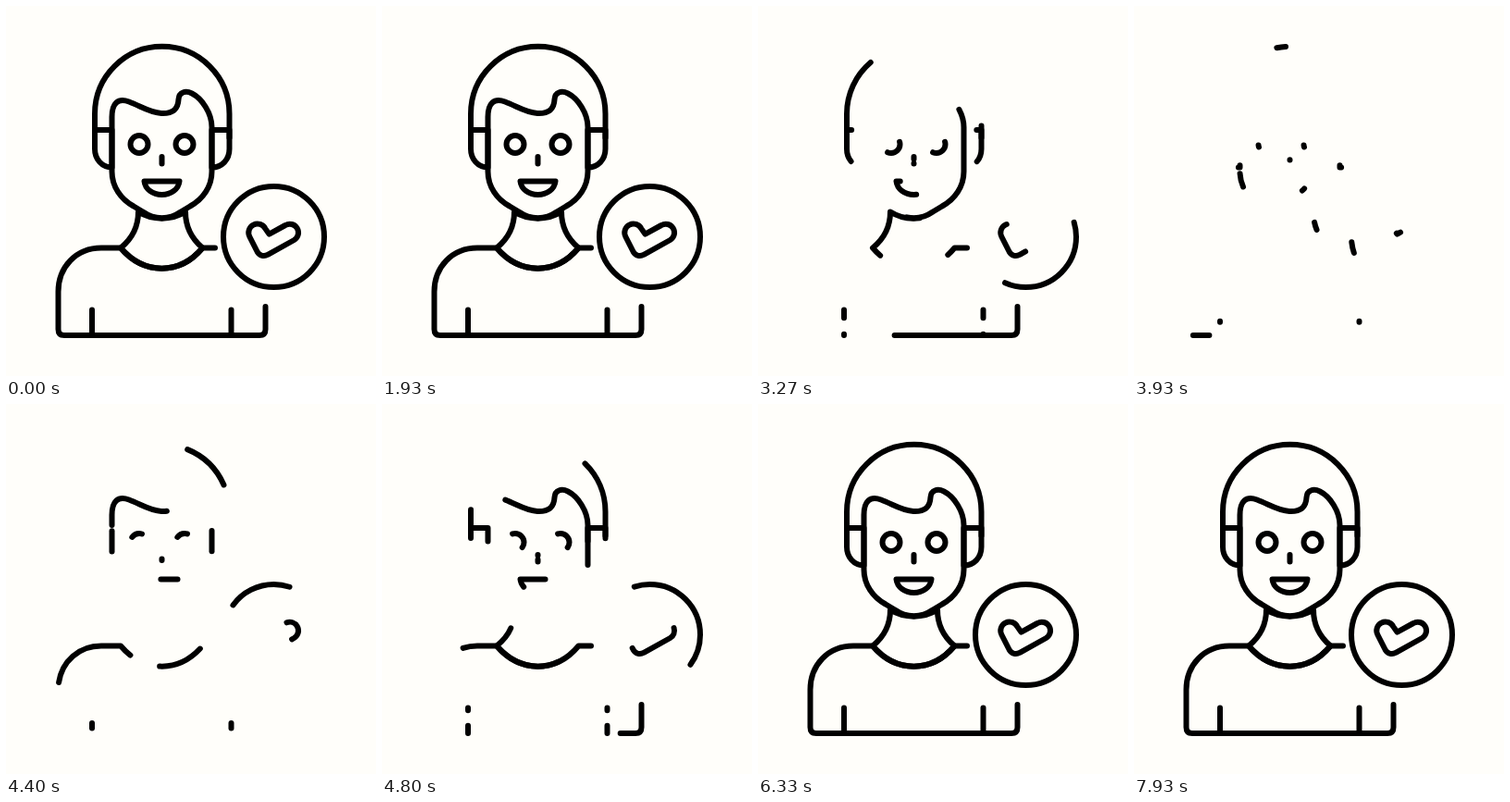
Recreate the animation shown at these times as an HTML page. Size 400 px wide and 400 px high, loop 7990 ms.

```html
<!DOCTYPE html>
<html lang="en">
<head>
<meta charset="utf-8">
<title>Verified user icon</title>
<style>
  html, body { margin: 0; height: 100%; overflow: hidden; background: #fffefa; }
  svg { display: block; width: 100vw; height: 100vh; }
</style>
</head>
<body>
<svg viewBox="0 0 400 400">
  <g id="icon" fill="none" stroke="#000" stroke-width="6" stroke-linecap="round" stroke-linejoin="round"></g>
</svg>
<script>
const LOOP = 7990, START = 2000, DURATION = 4000;
const icon = document.getElementById('icon');

// Circle starting at three o'clock, clockwise
const circle = (x, y, r) =>
  `M${x + r} ${y}A${r} ${r} 0 0 1 ${x - r} ${y}A${r} ${r} 0 0 1 ${x + r} ${y}Z`;

const shapes = [
  // hair and ears
  'M96 142.5V116.5A72.75 72.75 0 0 1 241.5 116.5V142.5',
  'M96 134V154.5C96 166 104 174.5 114.5 174.5V134Z',
  'M241.5 134V154.5C241.5 166 233.5 174.5 222.5 174.5V134Z',
  // face with hairline
  'M222.5 131V179C222.5 195 213 209 199 216.5L189 222.5C176 231.5 161 231.5 148 222.5L138 216.5' +
  'C124 209 114.5 195 114.5 179V120C114.5 105 121 99 133 103.5C146 108.5 156 115.5 168 116' +
  'C182 116.5 186 110 186.5 101C187 93 194 91 201 94.5C212 100 222.5 116 222.5 131Z',
  // eyes, nose, mouth
  circle(144, 149.5, 9.5),
  circle(193, 149.5, 9.5),
  'M168.5 163V170.5',
  'M149.5 189.5C150.5 198 158.5 204 168.5 204C178.5 204 186.5 198 187.5 189.5Z',
  // neck
  'M124 261.5C137 251 143 239 143 222.5C158 232 179 232 194 222.5C194 239 200 251 212.5 261.5C188 291 149 291 124 261.5Z',
  // body and sleeves
  'M280.5 325V349.5Q280.5 356 274 356H63Q56.5 356 56.5 349.5V309C56.5 282 76 261.5 103 261.5H124C149 291 188 291 212.5 261.5H226',
  'M93 328.5V356',
  'M243.5 328.5V356',
  // badge
  circle(289.5, 249.5, 54.5),
  'M283 268.8A8 8 0 0 1 271.8 266L263.4 249.5A9.5 9.5 0 0 1 280.3 240.6L284.5 246.6L302 237A9.3 9.3 0 0 1 311.5 253Z'
];

for (const d of shapes) {
  const path = document.createElementNS('http://www.w3.org/2000/svg', 'path');
  path.setAttribute('d', d);
  path.setAttribute('pathLength', 100);
  icon.append(path);
}

// Every outline shrinks to its middle and regrows while its trim offset turns twice
function draw(time) {
  const u = Math.min(1, Math.max(0, (time % LOOP - START) / DURATION));
  const cut = Math.min(u, 1 - u);
  const visible = 100 * (1 - 2 * cut);
  const from = 100 * ((cut + 2 * u) % 1);
  icon.style.visibility = visible > 0.05 ? 'visible' : 'hidden';
  icon.style.strokeDasharray = cut ? `${visible} ${100 - visible}` : 'none';
  icon.style.strokeDashoffset = -from;
}

const begin = performance.now();
function frame() {
  draw(performance.now() - begin);
  requestAnimationFrame(frame);
}
frame();
</script>
</body>
</html>
```
